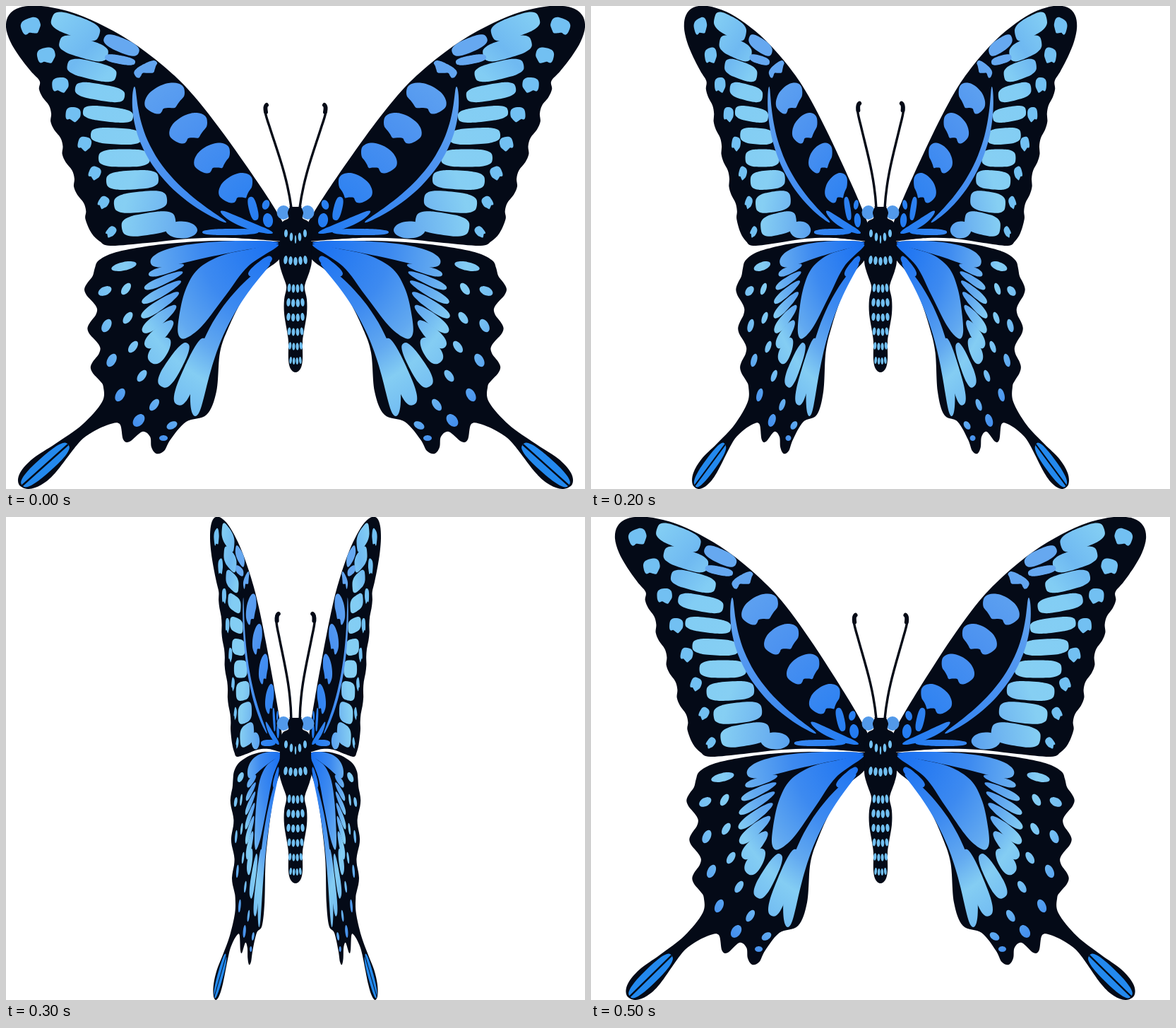
Write an HTML page that moves like this. It is 820 by 683 pixels and loops after 600 ms.

```html
<!DOCTYPE html>
<html lang="en">
<head>
<meta charset="utf-8">
<title>Butterfly</title>
<style>
html, body { margin: 0; height: 100%; overflow: hidden; background: #fff; }
svg { display: block; width: 100%; height: 100%; }
</style>
</head>
<body>
<svg viewBox="0 0 820 683">
  <defs>
    <radialGradient id="deep" gradientUnits="userSpaceOnUse" cx="390" cy="333" r="330">
      <stop stop-color="#1c78f2"/><stop offset=".3" stop-color="#3485f1"/>
      <stop offset=".6" stop-color="#4c92f0"/><stop offset="1" stop-color="#66a8f0"/>
    </radialGradient>
    <radialGradient id="pale" gradientUnits="userSpaceOnUse" cx="390" cy="333" r="455">
      <stop stop-color="#2a7cf0"/><stop offset=".2" stop-color="#4a94f0"/>
      <stop offset=".35" stop-color="#6db3f0"/><stop offset=".5" stop-color="#86cff3"/>
      <stop offset=".75" stop-color="#82cdf4"/><stop offset=".85" stop-color="#6fb9f1"/>
      <stop offset="1" stop-color="#84cff4"/>
    </radialGradient>
    <radialGradient id="low" gradientUnits="userSpaceOnUse" cx="390" cy="333" r="330">
      <stop stop-color="#176ff2"/><stop offset=".35" stop-color="#3d8af0"/>
      <stop offset=".55" stop-color="#62a9f0"/><stop offset=".68" stop-color="#84cdf3"/>
      <stop offset=".82" stop-color="#74bef2"/><stop offset="1" stop-color="#4590ee"/>
    </radialGradient>
  </defs>
  <g id="half">
    <g id="wing"></g>
    <ellipse cx="393" cy="292" rx="9.5" ry="10" fill="#5299ea"/>
    <g id="feeler" fill="none" stroke="#040a17" stroke-linecap="round">
      <path d="M404 285C398 240 384 205 373 170C366 150 365 143 369 139" stroke-width="3.4"/>
      <path d="M368 150Q366.5 142 369 140" stroke-width="6"/>
    </g>
  </g>
  <use href="#half" transform="translate(820) scale(-1 1)"/>
  <g id="body"></g>
</svg>
<script>
const INK = '#040a17', SKY = '#72c0f2';
const DEEP = 'url(#deep)', PALE = 'url(#pale)', LOW = 'url(#low)';
const { sin, cos, abs, sign, PI } = Math;
const $ = id => document.getElementById(id);
const wing = $('wing'), body = $('body');
const add = (to, markup) => to.insertAdjacentHTML('beforeend', markup);
const range = (n, f) => Array.from({ length: n }, (_, i) => f(i));
const pts = text => text.split(',').map(p => p.trim().split(' ').map(Number));
const quad = (a, c, b, t) => (1 - t) ** 2 * a + 2 * t * (1 - t) * c + t * t * b;

// Smooth closed curve through the points; a doubled point makes a corner.
function blob(to, fill, p) {
  const at = i => p[(i + p.length) % p.length];
  const d = p.map((b, i) => {
    const a = at(i - 1), c = at(i + 1), e = at(i + 2);
    return 'C' + [0, 1].map(k => b[k] + (c[k] - a[k]) / 6)
      + ' ' + [0, 1].map(k => c[k] - (e[k] - b[k]) / 6) + ' ' + c;
  });
  add(to, `<path fill="${fill}" d="M${p[0]}${d.join('')}Z"/>`);
}

// Rounded cell of half width w along a bent spine from (x0,y0) to (x1,y1).
function petal(to, fill, w, [x0, y0, x1, y1, cx = (x0 + x1) / 2, cy = (y0 + y1) / 2],
               { square = .75, taper = 0, ripple = 0 } = {}) {
  const bend = v => sign(v) * abs(v) ** square;
  blob(to, fill, range(24, i => {
    const a = i / 12 * PI, u = bend(cos(a)), t = (1 + u) / 2;
    const dx = (1 - t) * (cx - x0) + t * (x1 - cx), dy = (1 - t) * (cy - y0) + t * (y1 - cy);
    const wave = sin(a) > 0 ? 1 + ripple * sin(5 * u) : 1;
    const k = bend(sin(a)) * w * (1 + taper * u) * wave / Math.hypot(dx, dy);
    return [quad(x0, cx, x1, t) - dy * k, quad(y0, cy, y1, t) + dx * k];
  }));
}
function dot(to, fill, x, y, r, w, turn, shape = { square: 1 }) {
  const dx = r * cos(turn * PI / 180), dy = r * sin(turn * PI / 180);
  petal(to, fill, w, [x - dx, y - dy, x + dx, y + dy], shape);
}

// Wing silhouettes with scalloped outer edges
blob(wing, INK, [
  ...pts('392 333,392 333,391 304,325 204,266 127,222 84,175 49,130 24,90 8,50 0,20 2,4 13,0 30,6 50,18 70,35 92'),
  ...range(18, i => {
    const y = 106 + i * 11.5;
    return [44.5 + (y - 103) * .357 + 3.5 * cos((y - 145) / 46 * 2 * PI), y];
  }),
  ...pts('121 321,133 333,148 339,200 335,260 329,320 328')]);
blob(wing, INK, [
  ...pts('393 333,393 333,300 332,230 336,180 343,150 350,131 360,126 370'),
  ...range(18, i => {
    const y = 382 + i * 9.2;
    return [119 + (y - 402) * .08 - 8 * cos((y - 402) / 55 * 2 * PI), y];
  }),
  ...pts(`136 560,108 592,70 619,38 640,20 660,18 676,31 683,50 677,70 660,102 619,120 604,145 592,161 591,
    166 613,175 616,193 602,204 609,206 624,213 633,224 629,233 613,255 588,284 578,298 545,303 490,315 455,335 415,360 380,388 357`)]);

// Upper wing: margin spots and the pale row
range(8, i => {
  const t = i / 7;
  dot(wing, SKY, quad(35, 115, 149, t), 28 + 291 * t, 14 - 8 * t, 11 - 3 * t, 60 * t - 20, { ripple: .2 });
});
range(10, i => petal(wing, PALE, 10.5 + abs(i - 4),
  [65 + 11 * i, 17 + 33 * i, 132 + 12 * i, 41 + 29 * i], { square: .65 }));

// Upper wing: blue bars, long vein and small cells
range(4, i => petal(wing, DEEP, 17,
  [203 + 35 * i, 148 + 42 * i, 253 + 32 * i, 122 + 43 * i, 219 + 35 * i, 123 + 42 * i], { ripple: .2 }));
petal(wing, DEEP, 5.5, [182, 114, 312, 306, 177, 234], { square: .9 });
petal(wing, DEEP, 10, [139, 45, 188, 66]);
petal(wing, DEEP, 6, [140, 72, 183, 80]);
petal(wing, DEEP, 7, [182, 97, 214, 80], { ripple: .5 });
petal(wing, PALE, 12, [226, 316, 271, 317], { square: 1 });
petal(wing, DEEP, 4.5, [278, 320, 358, 319]);
petal(wing, DEEP, 5.5, [304, 290, 378, 321, 330, 308], { square: 1 });
petal(wing, DEEP, 6, [346, 270, 354, 303]);
dot(wing, DEEP, 368, 281, 7, 5, -70);
dot(wing, DEEP, 371, 303, 10, 7, 82);

// Lower wing: large cells, then the feathered row
petal(wing, LOW, 11, [205, 364, 386, 335, 262, 342], { square: .9, taper: -.5 });
blob(wing, LOW, pts('386 338,345 344,305 353,272 372,254 402,245 440,244 464,254 470,278 452,312 408,343 368'));
petal(wing, LOW, 6, [344, 381, 376, 355]);
petal(wing, LOW, 11, [374, 364, 268, 580, 275, 449], { square: .9, taper: .4 });
petal(wing, LOW, 11, [281, 470, 243, 564], { taper: .2 });
petal(wing, LOW, 11, [257, 477, 220, 538], { taper: .2 });
range(7, i => {
  const t = i / 6;
  petal(wing, LOW, 5.5 + .16 * i * i,
    [quad(252, 248, 231, t), quad(366, 392, 470, t), quad(202, 180, 205, t), quad(380, 438, 504, t)],
    { square: .9, taper: .2 });
});

// Lower wing: spots in two columns and along the bottom
range(4, i => dot(wing, LOW, 140 + 2.4 * i * i, 403 + 49 * i, 10, 6, -25 - 35 * Math.min(i, 1)));
range(5, i => dot(wing, LOW, 170 + 2.5 * i * i, 400 + 41 * i, 9.5, 5.2, -54));
dot(wing, LOW, 167, 368, 18, 6, -12);
dot(wing, LOW, 188, 586, 10, 7, -50);
dot(wing, LOW, 235, 593, 8, 5, -28);
dot(wing, LOW, 223, 611, 6, 4, 0);

// Tail
petal(wing, '#2389ee', 11, [23, 678, 88, 620]);
add(wing, `<path d="M22 679L88 620" stroke="${INK}" stroke-width="2.5"/>`);

// Body: half widths by height, mirrored
const side = pts('8 284,8 284,11 292,10 300,18 305,23 318,22 333,23 360,20 375,14 392,13 400,16 415,16 435,12 460,10 475,10 500,7 513');
blob(body, INK, [...side.map(([w, y]) => [410 + w, y]), [410, 518],
  ...side.reverse().map(([w, y]) => [410 - w, y])]);
function marks(y, n, gap, w, h) {
  range(n, i => {
    const k = i - (n - 1) / 2;
    dot(body, SKY, 410 + k * gap, y - abs(k), h, w, 90 - k * 3);
  });
}
marks(361, 5, 7, 2.7, 6);
range(6, j => {
  const gap = 7 - .7 * abs(j - 1.5);
  marks(400 + 20.5 * j, 4, gap, gap * .4, 6 - .2 * j);
});
marks(327, 2, 12, 2.3, 6);
marks(322, 2, 27, 2.5, 5.5);
marks(330, 1, 0, 1.2, 6);

// Six held poses: the wings fold towards the body, then open again.
const spread = [1, .913, .662, .259];
function draw() {
  const step = Math.floor(performance.now() / 100) % 6, pose = Math.min(step, 6 - step);
  const s = spread[pose];
  wing.setAttribute('transform', `translate(${390 * (1 - s)}) scale(${s} 1)`);
  $('feeler').setAttribute('transform', `rotate(${pose * 2.2} 404 284)`);
  requestAnimationFrame(draw);
}
draw();
</script>
</body>
</html>
```
